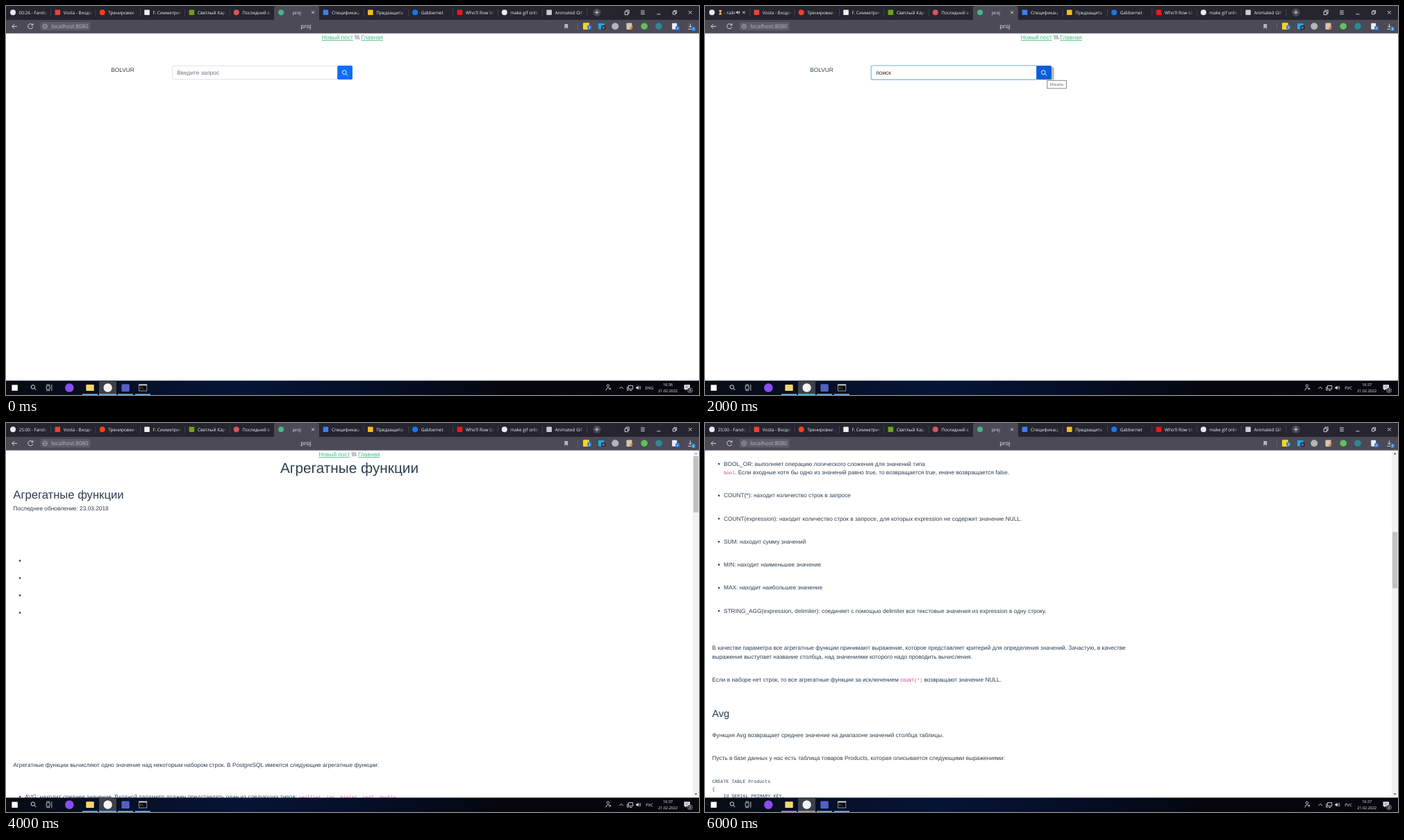
An HTML page that plays this animation: 998 by 561 pixels, repeating every 7 s.

```html
<!DOCTYPE html>
<html lang="ru">
<head>
<meta charset="utf-8">
<title>proj</title>
<style>
  html, body { margin: 0; width: 100%; height: 100%; overflow: hidden; background: #fff; }
  svg { display: block; width: 100%; height: 100%; }
  text { text-rendering: geometricPrecision; white-space: pre; }
  .page { font: 8.32px "Liberation Sans", Arial, sans-serif; fill: #2c3e50; }
  .ui { font: 6.4px "Open Sans", "Noto Sans", sans-serif; fill: #f1f1f4; }
  .code { font: 6.68px "Liberation Mono", monospace; }
  .pink { fill: #d63384; }
  .green { fill: #42b983; text-decoration: underline; }
  .blue { fill: #0d6efd; text-decoration: underline; }
  .line { fill: none; stroke: #e6e6ea; stroke-width: .9; }
</style>
</head>
<body>
<svg id="stage" viewBox="0 0 998 561" xmlns="http://www.w3.org/2000/svg"></svg>
<script>
const STEP = 1000, COUNT = 7;
const BAR = '#25252f', TOOL = '#4b4a56';

// Markup helpers
const rect = (x, y, w, h, fill, more = '') =>
  `<rect x="${x}" y="${y}" width="${w}" height="${h}" fill="${fill}" ${more}/>`;
const dot = (x, y, r, fill, more = '') =>
  `<circle cx="${x}" cy="${y}" r="${r}" fill="${fill}" ${more}/>`;
const line = (d, more = '') => `<path class="line" d="${d}" ${more}/>`;
const text = (x, y, s, more = '') => `<text x="${x}" y="${y}" ${more}>${s}</text>`;
const mid = 'text-anchor="middle"';
const size = (n, more = '') => `style="font-size:${n}px" ${more}`;
const group = (id, body, more = '') => `<g id="${id}" ${more}>${body}</g>`;
const cross = (x, y, r) => line(`M${x - r} ${y - r}l${2 * r} ${2 * r}m0 ${-2 * r}l${-2 * r} ${2 * r}`);
const lens = (x, y, r) => line(
  `M${x + r * .7} ${y + r * .7}l${r} ${r}M${x + r} ${y}a${r} ${r} 0 1 0 ${-2 * r} 0a${r} ${r} 0 1 0 ${2 * r} 0`,
  'style="stroke:#fff"');
const speaker = (x, y, s) =>
  `<path transform="translate(${x} ${y}) scale(${s})" fill="#eee" d="M-3-1h1.5L.5-3v6L-1.5 1H-3z"/>` +
  line(`M${x + 1.4 * s} ${y - 1.5 * s}q${1.4 * s} ${1.5 * s} 0 ${3 * s}m${1.2 * s} ${-4.4 * s}q${2.2 * s} ${2.9 * s} 0 ${5.8 * s}`,
    'style="stroke-width:.7"');
const nav = x => text(x, 48.2,
  '<tspan class="green">Новый пост</tspan> \\\\\\ <tspan class="green">Главная</tspan>', mid);

// Search screen
function search() {
  const field = stroke => rect(239.7, 86.3, 238, 19.4, '#fff', `rx="2" stroke="${stroke}" stroke-width=".7"`);
  return nav(499) + text(151.3, 95, 'BOLVUR') +
    group('btnShade', rect(480, 88, 22.7, 18.4, '#b9b9bd', 'rx="2"')) +
    group('idleField', field('#ced4da')) +
    group('ring', rect(238.6, 85.2, 240.4, 21.8, '#8fbcfb', 'rx="2.6"') +
      rect(240, 86.6, 237.8, 18.8, '#fff', 'rx="1.6"')) +
    group('btnRing', rect(475.8, 84.8, 24.6, 22.6, '#86b5fb', 'rx="3"')) +
    rect(477.2, 86, 21.8, 20, '#0d6efd', 'id="btn" rx="1.8"') + lens(487.3, 95.7, 2.9) +
    group('hint', text(246.3, 98.8, 'Введите запрос', 'fill="#6c757d"')) +
    group('query', text(246.3, 98.8, 'поиск', 'fill="#212529"')) +
    group('tip', rect(492.8, 107.3, 27.6, 11.6, '#fff', 'stroke="#6b6b6b" stroke-width=".8"') +
      text(506.6, 115.3, 'Искать', 'class="ui" ' + mid + ' style="font-size:5.8px;fill:#575757"')) +
    group('found', text(477.3, 119.9, 'Найдено: 1') + dot(27.8, 134, 1.9, '#0d6efd') +
      text(42.6, 137.3, 'Агрегатные функции', size(12.48, 'class="blue"')) +
      text(51.8, 152.2, '2022-02-20', size(9.36, 'class="blue"')));
}

// Article: `code` spans are marked with backticks
const code = s => s.replace(/`([^`]+)`/g, '<tspan class="code pink">$1</tspan>');
const LINE = 12.5;
const items = [
  [230, 'AVG: находит среднее значение. Входной параметр должен представлять один из следующих типов: `smallint, int, bigint, real, double`',
    '`precision, numeric, interval`. Для целочисленнных параметров результатом будет значение типа `numeric`, для параметров, которые представляют число с плавающей точкой, -',
    'значение типа `double precision`.'],
  [288, 'BIT_AND: выполняет операцию побитового умножения (операции логического И) для чисел следующих типов:',
    '`smallint, int, bigint, bit`. Если параметр содержит значение NULL, то возвращается NULL.'],
  [333.7, 'BIT_OR: выполняет операцию побитового сложения (операции логического ИЛИ) для чисел следующих типов:',
    '`smallint, int, bigint, bit`. Если параметр содержит значение NULL, то возвращается NULL.'],
  [379.4, 'BOOL_AND: выполняет операцию логического умножения для значений типа',
    '`bool`. Если входные все значения равны true, то возвращается true, иначе возвращается false.'],
  [425.2, 'BOOL_OR: выполняет операцию логического сложения для значений типа',
    '`bool`. Если входные хотя бы одно из значений равно true, то возвращается true, иначе возвращается false.'],
  [470.9, 'COUNT(*): находит количество строк в запросе'],
  [504.2, 'COUNT(expression): находит количество строк в запросе, для которых expression не содержит значение NULL.'],
  [537.4, 'SUM: находит сумму значений'],
  [570.6, 'MIN: находит наименьшее значение'],
  [603.9, 'MAX: находит наибольшее значение'],
  [637.2, 'STRING_AGG(expression, delimiter): соединяет с помощью delimiter все текстовые значения из expression в одну строку.'],
];
const paras = [
  [184, 'Агрегатные функции вычисляют одно значение над некоторым набором строк. В PostgreSQL имеются следующие агрегатные функции:'],
  [691, 'В качестве параметра все агрегатные функции принимают выражение, которое представляет критерий для определения значений. Зачастую, в качестве',
    'выражения выступает название столбца, над значениями которого надо проводить вычисления.'],
  [736.8, 'Если в наборе нет строк, то все агрегатные функции за исключением `COUNT(*)` возвращают значение NULL.'],
  [816.7, 'Функция Avg возвращает среднее значение на диапазоне значений столбца таблицы.'],
  [850, 'Пусть в базе данных у нас есть таблица товаров Products, которая описывается следующими выражениями:'],
];
const TOP = 311.6;

function article() {
  const block = x => ([y, ...rows]) => rows.map((s, i) => text(x, y + i * LINE, code(s))).join('');
  const head = nav(494.5) +
    text(494.5, 71.8, 'Агрегатные функции', size(20.8, mid)) +
    text(10.3, 109.2, 'Агрегатные функции', size(16.64)) +
    text(10.3, 126.3, 'Последнее обновление: 23.03.2018') +
    [0, 1, 2, 3].map(i => dot(20, 198.6 + 25 * i, 1.3, '#2c3e50')).join('');
  const sql = ['CREATE TABLE Products', '{', '    Id SERIAL PRIMARY KEY,'];
  return `<g transform="translate(0 ${-TOP})">${head}</g>` +
    paras.map(block(10.3)).join('') + items.map(block(27)).join('') +
    items.map(([y]) => dot(20, y - 2.6, 1.3, '#2c3e50')).join('') +
    text(10.3, 787.2, 'Avg', size(14.56)) +
    sql.map((s, i) => text(10.3, 882.3 + i * 10.9, s, 'class="code"')).join('');
}

const scrollbar = () => rect(989, 39, 9, 502, '#f3f0f1') +
  rect(990, 0, 7.2, 81, '#c1c1c1', 'id="thumb"') +
  '<path id="up" d="M991.6 45.2h4l-2-2.4z"/><path fill="#505050" d="M991.6 534.2h4l-2 2.4z"/>';

// Browser frame: icon shape, icon colour, label
const tabs = [
  ['o', '#e8eaf0', ''], ['s', '#ea4335', 'Vosta - Входящие'], ['o', '#fc3f1d', 'Тренировки по'],
  ['s', '#f2eeee', 'F. Симметричная'], ['s', '#6fa315', 'Светлый Карп в'], ['o', '#d8545c', 'Последний в роще'],
  ['o', '#41b883', ''], ['s', '#3f7df0', 'Спецификация'], ['s', '#f7bc1c', 'Предзащита'],
  ['o', '#1677f0', 'Gabbernet'], ['s', '#f01818', 'Who\'ll Row Us Now'], ['o', '#e8eaf0', 'make gif online'],
  ['s', '#c9cbd2', 'Animated GIF'],
];
const TAB = 64.35;

function tabStrip() {
  const marks = tabs.map(([kind, color, label], i) => {
    const x = i * TAB;
    const icon = kind === 'o' ? dot(x + 10, 9.3, 4, color) : rect(x + 6.2, 5.6, 7.6, 7.4, color, 'rx=".8"');
    const sep = i === 5 || i === 6 ? '' : rect(x + TAB, 4.5, .6, 10, '#55555f');
    const name = `<svg x="${x + 18.5}" y="0" width="41" height="19">${text(0, 11.7, label, i ? '' : 'id="timer"')}</svg>`;
    return icon + sep + name + (i === 6 ? '' : rect(x + 53, 1, 7, 17, 'url(#fade)'));
  });
  return rect(0, 0, 998, 20, BAR) +
    `<path d="M386 20V3q0-3 3-3h59q3 0 3 3v17z" fill="${TOOL}"/>` + marks.join('') +
    text(419, 11.7, 'proj', mid) + cross(442, 9.3, 1.9) +
    group('busy', `<path fill="#f0b54a" d="M20 6h4.2v1L22.6 9.3l1.6 2.3v1H20v-1l1.6-2.3L20 7z"/>` +
      rect(43, 2, 20, 15, BAR) + speaker(47, 9.3, .8) + cross(56, 9.3, 1.9)) +
    dot(851, 9.2, 5.8, '#464650') + line('M848 9.2h6m-3-3v6') +
    line('M891.2 8h4.4v4.6h-4.4zM892.8 7.6V6h4.4v4.8h-1.6') +
    line('M914.2 7h5.6m-5.6 2.3h5.6m-5.6 2.3h5.6') + line('M937.4 11.8h5') +
    line('M960.4 8.2h3.8v3.8h-3.8zM961.8 8V6.6h3.9v3.9h-1.2') + cross(985.4, 9.3, 2.3);
}

const badge = (x, y, fill, label, id = '') =>
  rect(x - 2.9, y - 3, 5.8, 6, fill, 'rx="1.6"') +
  text(x, y + 1.9, label, `${mid} ${id} style="font-size:5px;font-weight:600;fill:#fff"`);

function toolbar() {
  return rect(0, 19, 998, 20.5, TOOL) +
    line('M16 29.4H8.8m3.2-3.2l-3.2 3.2l3.2 3.2') +
    line('M38.3 27.3a3.6 3.6 0 1 0 .4 3M38.9 25.2v2.6h-2.6') +
    rect(49.5, 23, 72, 12.6, '#5d5c68', 'rx="3"') +
    dot(56.2, 29.4, 3.4, 'none', 'stroke="#a9a9b2" stroke-width=".7"') +
    line('M52.8 29.4h6.8M56.2 26q-3.4 3.4 0 6.8q3.4-3.4 0-6.8', 'style="stroke:#a9a9b2;stroke-width:.6"') +
    text(65.3, 32.2, 'localhost:8080', 'style="font-size:7.9px;fill:#bcbcc4"') +
    text(431.8, 32.2, 'proj', size(8.2, mid)) +
    '<path fill="#b5b5bd" d="M804.4 26h4.8v7l-2.4-1.9l-2.4 1.9z"/>' + rect(823, 25, .6, 9, '#73737e') +
    rect(831, 24.3, 9, 9.6, '#f6d32b', 'rx="1"') + badge(840.2, 30.6, '#2d7de0', '1') +
    rect(853, 25, 8.6, 8.4, '#22a5e8', 'rx="1"') + badge(860.4, 31, '#1b1b26', '0') +
    dot(877.3, 29.2, 5, '#b4b4ba') + rect(893.5, 24.5, 8, 9.6, '#d8c5ae', 'rx="1"') +
    '<path d="M898 32.5l3.6-4l1.6 1.4l-3.6 4z" fill="#d97a32"/>' +
    dot(919.2, 29.2, 4.8, '#62c05c') + dot(940, 29.2, 4.8, '#2c8a94') +
    rect(959.2, 24.8, 7, 9, '#eeeef2', 'rx=".8"') + badge(967, 32, '#2d7de0', '✓') +
    line('M985.4 25.5v5.4m-2.2-2.2l2.2 2.2l2.2-2.2M982 33.3h5') + badge(990, 33, '#2a7fd0', '', 'id="saved"');
}

function taskbar() {
  const under = [110, 134, 161, 186].map(x => rect(x, 559.5, x === 134 ? 25 : 22, 1.5, '#76b9ed')).join('');
  return rect(0, 540.3, 998, 20.7, 'url(#night)') + rect(134, 540.3, 25, 20.7, '#3b4049') + under +
    rect(8.4, 546.4, 8.4, 8.4, '#fff') + lens(38.8, 549.4, 2.7) +
    line('M58.2 547.8h5v5h-5zM58.2 546h5M58.2 554.6h5M65.8 546v8.8', 'style="stroke-width:.8"') +
    dot(91.3, 550.5, 6.3, '#8a4df0') + rect(115.3, 546, 11.4, 9, '#f8d56a', 'rx=".8"') +
    dot(146.6, 550.5, 6.2, '#f7f3f3') + rect(166.4, 545.2, 11.4, 10.8, '#5560c4', 'rx="1.5"') +
    rect(191.4, 546, 11.4, 9, '#0a0a0a', 'stroke="#a9adb3" stroke-width=".8"') +
    rect(191.2, 545.6, 11.8, 1.8, '#d2d5da') +
    text(192.7, 551.6, 'C:\\_', 'style="font-size:3.6px;fill:#ddd"') +
    line('M864 554.5q0-3.8 3-3.8q1.6 0 2 1M868.6 547.6a1.7 1.7 0 1 0-3.4 0a1.7 1.7 0 1 0 3.4 0M868.5 553.5l2.2-2.2m-2 0h2v2',
      'style="stroke-width:.8"') +
    line('M883.3 552l2.8-2.8l2.8 2.8') + line('M896.4 547.6h6.4v4.8h-6.4zM898 554.5h3.4M894.8 549v5.2h2') +
    speaker(910.2, 550.5, 1) +
    text(926.6, 552.8, '', size(5.9, mid + ' id="lang"')) +
    text(953.2, 547.7, '', size(5.5, mid + ' id="clock"')) +
    text(953.2, 557, '21.02.2022', size(5.5, mid)) +
    '<path fill="#f1f1f1" d="M976.6 546.2h8.4v6.6h-5l-1.8 1.8v-1.8h-1.6z"/>' +
    line('M978.2 548.4h5.2m-5.2 2h4', 'style="stroke:#333;stroke-width:.6"') +
    dot(985, 554.2, 3.6, '#33373f', 'stroke="#aaa" stroke-width=".5"') + text(985, 556, '3', size(5, mid));
}

const stage = document.getElementById('stage');
stage.innerHTML = `<defs>
  <linearGradient id="fade"><stop stop-color="${BAR}" stop-opacity="0"/><stop offset="1" stop-color="${BAR}"/></linearGradient>
  <linearGradient id="night"><stop stop-color="#080b12"/><stop offset=".2" stop-color="#06102a"/>
    <stop offset=".34" stop-color="#061436"/><stop offset=".55" stop-color="#050d24"/>
    <stop offset=".72" stop-color="#05070d"/><stop offset="1" stop-color="#06080d"/></linearGradient>
  </defs>` + rect(0, 0, 998, 561, '#fff') +
  group('search', search(), 'class="page"') +
  group('article', article(), 'class="page"') + group('scroll', scrollbar()) +
  group('chrome', toolbar() + tabStrip() + taskbar(), 'class="ui"');

const get = id => document.getElementById(id);
const show = (id, on) => get(id).style.display = on ? '' : 'none';
const put = (id, s) => { if (get(id).textContent !== s) get(id).textContent = s; };
const offsets = [TOP, 0, -363.6], thumbs = [48, 98.2, 157.2];

function draw(ms) {
  const n = Math.floor(ms / STEP) % COUNT;
  const reading = n > 3, typing = n === 1 || n === 2, busy = n === 2 || n === 3;
  show('search', !reading);
  show('article', reading);
  show('scroll', reading);
  show('idleField', !typing);
  show('ring', typing);
  show('btnShade', typing);
  show('btnRing', n === 3);
  show('hint', n === 0);
  show('query', n > 0);
  show('tip', n === 2);
  show('found', n === 3);
  show('busy', busy);
  get('btn').setAttribute('fill', busy ? '#0b5ed7' : '#0d6efd');
  get('timer').setAttribute('x', busy ? 8.8 : 0);
  put('timer', busy ? '- тайм' : ['00:26', '00:10'][n] ? ['00:26', '00:10'][n] + ' - Fandol' : '25:00 - Fandol');
  put('lang', n ? 'РУС' : 'ENG');
  put('clock', n < 2 ? '16:36' : '16:37');
  put('saved', String(n + 1));
  if (reading) {
    const k = n - 4;
    get('article').setAttribute('transform', `translate(0 ${offsets[k]})`);
    get('thumb').setAttribute('y', thumbs[k]);
    get('up').setAttribute('fill', k ? '#505050' : '#a3a3a3');
  }
}

const start = performance.now();
function tick() {
  draw(performance.now() - start);
  requestAnimationFrame(tick);
}
tick();
</script>
</body>
</html>
```
